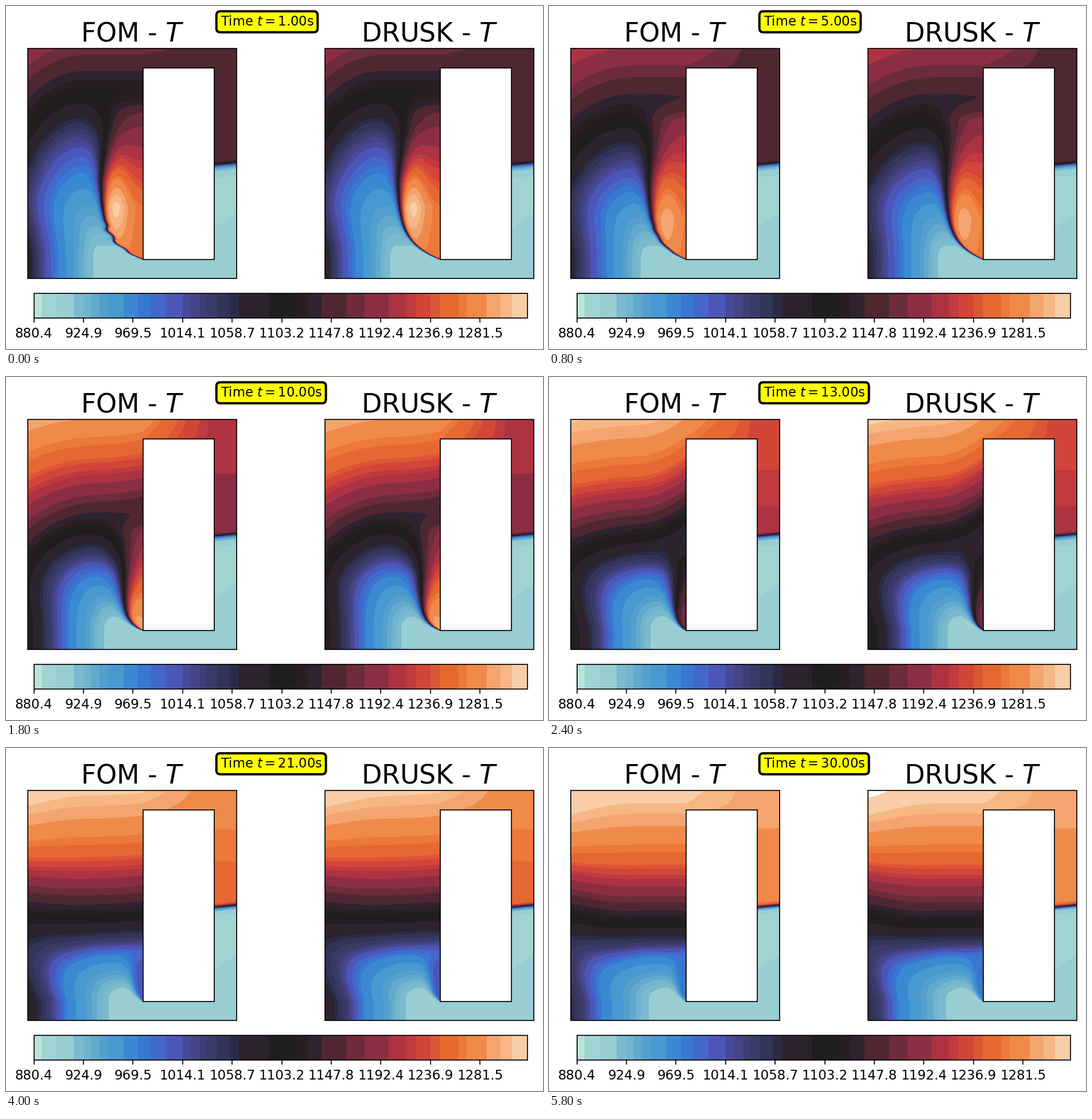
Write a matplotlib script that moves like this. It is 936 px wide and 598 px high and loops after 6 s.

```python
import numpy as np
import matplotlib.pyplot as plt
from matplotlib.animation import FuncAnimation
from matplotlib.colors import to_rgb
from matplotlib.patches import Rectangle

W, H, DPI = 936, 598, 100
PT = 72 / DPI

# Colour bands: left edge on the colour bar (px) and fill
EDGES = [49, 62, 88, 118, 135, 148, 163, 178, 205, 230, 252, 266, 278, 308,
         322, 338, 350, 368, 390, 406, 458, 475, 482, 505, 525, 550, 593, 625,
         667, 697, 714, 740, 756, 788, 803, 838, 862, 882, 909.5]
FILLS = """b9e5d9 a0d3d2 98cdd1 7abace 72b4cd 60aacd 559fcd 4899d0 3c89d3
 3878d0 4169cd 4766c9 4a57b8 49499a 464488 3f3e74 3a3a68 32345a 2a2c47 2c232c
 211d1f 1e1e1d 211e1e 291e20 2e232f 4f2731 6c2c3c 8c2e43 ad3342 c03a3f d14638
 dc5636 e56833 ec783a f08a4a f4a56f f7b784 f9cda7 ffffff""".split()
LUT = np.array([to_rgb("#" + c) for c in FILLS])


def paint(v):
    """Percent of the colour bar -> banded RGB."""
    return LUT[np.clip(np.digitize(49 + 8.6 * v, EDGES) - 1, 0, len(LUT) - 1)]


X, Y = np.meshgrid(np.arange(38.5, 402), np.arange(74.5, 475))
XL = np.minimum(X, 239)
WALL, CORNER = 239, 442

# Height of each level over the dome base: end + drift * (30 - t) + lift * decay
LEVELS = [21, 34, 50, 67, 84, 97]
END = np.array([75, 95, 133, 182, 243, 345])
DRIFT = np.array([0, 0.5, 1, 1.5, 1.5, 1.5])
LIFT = np.array([75, 108, 120, 150, 214, 232])
POWER = np.array([1, 1.5, 1.8, 2.5, 2.5, 2.5])


def ease(t, a, b):
    s = np.clip((t - a) / (b - a), 0, 1)
    return s * s * (3 - 2 * s)


def track(t, *keys):
    return np.interp(t, *zip(*keys))


def sigmoid(z):
    return 1 / (1 + np.exp(-np.clip(z, -40, 40)))


def dome(t):
    """Cold dome below a hot stratified layer."""
    xc = 140 + 3 * (min(t, 16) - 1) + 22 * ease(Y, 320, 430)
    dy = 440 - Y
    tilt = 30 * np.clip((t - 10) / 15, 0, 1) * np.sin(np.pi * dy / 270)
    rise = 45 * np.exp(-((t - 15) / 4) ** 2) * np.clip(dy / 200, 0, 1)
    dy = dy - np.where(dy > 0, tilt, 0) * (np.clip(150 - XL, 0, None) / 112) ** 2
    dy = np.clip(dy - rise * (np.clip(XL - 150, 0, None) / 89) ** 2, 0, None)
    aspect = 0.43 + 0.04 * min(t, 27) + (0.0004 + 0.005 * ease(t, 9, 19)) * dy
    h = np.hypot(dy, np.clip(xc - XL, 0, None) / aspect)
    tops = END + DRIFT * (30 - t) + LIFT * np.exp(-((t - 1) / 7) ** POWER)
    return np.interp(h, [0, 22, *tops, tops[-1] + 500], [5.5, 8, *LEVELS, 123])


def plume(t):
    """Temperature of the layer that climbs the wall."""
    low = track(t, (1, 86), (5, 86), (10, 93), (16, 42), (21, 28), (30, 22))
    high = track(t, (1, 59), (5, 67), (10, 70), (16, 42), (21, 38), (30, 32))
    y0 = 350 + 92 * ease(t, 3, 10)
    hot = low + (high - low) * np.clip((y0 - Y) / 200, 0, 1)
    core = ((X - 192 - 3.3 * (t - 1)) / 24) ** 2 + ((Y - 345 - 6 * (t - 1)) / 75) ** 2
    return hot + 12 * max(0, 1 - (t - 1) / 11) * np.exp(-core)


def plume_mask(t, rough):
    e = CORNER - Y
    reach = 19 + 55 * np.exp(-((t - 1) / 8) ** 2.5)
    curl = 30 - 15 * ease(t, 4, 10)
    lean = 0.0016 * reach * np.clip(e - 140, 0, None)
    front = WALL - reach * (1 - np.exp(-np.clip(e, 0, None) / curl)) + lean
    if rough:
        ripple = ease(Y, 370, 390) * (1 - ease(Y, 425, 440))
        front += 2.5 * np.exp(-(t - 1) / 3) * ripple * np.sin(2 * np.pi * Y / 22)
    front = np.where(e < 0, 300, front)
    s = np.clip(e / 240, 0, 1.2)
    width = 1.2 + 12 * s ** 2 + 18 * ease(t, 3, 11) * s
    top = track(t, (1, 130), (5, 145), (10, 215), (16, 330))
    return sigmoid((X - front) / width) * ease(Y, top, top + 60) * (X < 300)


def channel(t, v):
    """Top passage and right channel with its sharp cold interface."""
    hot = track(t, (1, 60), (5, 61), (10, 74), (16, 84.5), (21, 89), (30, 93))
    hot = hot - 5 * ease(t, 4, 10) * np.clip((Y - 100) / 160, 0, 1)
    q = np.clip((X - WALL) / 124, 0, 1)
    v = (1 - q) * v + q * hot
    yi = 275 - (X - 383) / 10
    cold = 3.9 + 1.2 * sigmoid((Y - 372 + 0.7 * (X - 383)) / 10)
    cold += 24 * np.exp(-np.clip(Y - yi, 0, None) / (6.5 - 0.1 * t))
    v = np.where(X > 300, cold + (v - cold) * sigmoid((yi - Y) / 1.5), v)
    return np.where((X > WALL) & (Y > CORNER), 5.2, v)


def field(t, rough):
    v = np.minimum(dome(t), 99.9)
    if not rough:
        v = v + t / 19 * np.exp(-((X - 38) / 75) ** 2 - ((Y - 74) / 25) ** 2)
    v = v + (plume(t) - v) * plume_mask(t, rough)
    return channel(t, v)


fig = plt.figure(figsize=(W / DPI, H / DPI), dpi=DPI, facecolor="white")
ax = fig.add_axes([0, 0, 1, 1])
ax.axis("off")


def frame(x0, y0, x1, y1, fill="none"):
    ax.add_patch(Rectangle((x0, y0), x1 - x0, y1 - y0, fc=fill, ec="black",
                           lw=1.7 * PT, zorder=3))


def picture(rgb, x0, y0, x1, y1):
    return ax.imshow(rgb, extent=(x0, x1, y1, y0), interpolation="nearest",
                     aspect="auto")


def panel(dx, title):
    im = picture(np.ones(X.shape + (3,)), 38 + dx, 74, 402 + dx, 475)
    frame(38 + dx, 74, 402 + dx, 475)
    frame(WALL + dx, 108, 363 + dx, CORNER, "white")
    ax.text(220 + dx, 61, title, fontsize=33, ha="center", va="baseline")
    return im


left = panel(0, "FOM - $T$")
right = panel(518, "DRUSK - $T$")

picture(paint((np.arange(49.5, 909) - 49) / 8.6)[None], 49, 501, 909, 544)
frame(49, 501, 909, 544)
for i in range(10):
    x = 48.6 + 86.4 * i
    ax.plot([x, x], [544, 551], color="black", lw=1.7 * PT)
    ax.text(x, 578, f"{880.375 + 44.57 * i:.1f}", fontsize=16.5,
            ha="center", va="baseline")

clock = ax.text(373.5, 34, "", fontsize=16.3, ha="left", va="baseline", zorder=5,
                bbox=dict(boxstyle="round,pad=0.3", fc="yellow", ec="black", lw=4 * PT))
ax.set(xlim=(0, W), ylim=(H, 0))


def update(i):
    t = i + 1
    left.set_data(paint(field(t, True)))
    right.set_data(paint(field(t, False)))
    clock.set_text(f"Time $t = {t:.2f}$s")
    return left, right, clock


anim = FuncAnimation(fig, update, frames=30, interval=200, repeat=True, repeat_delay=0)
plt.show()
```
